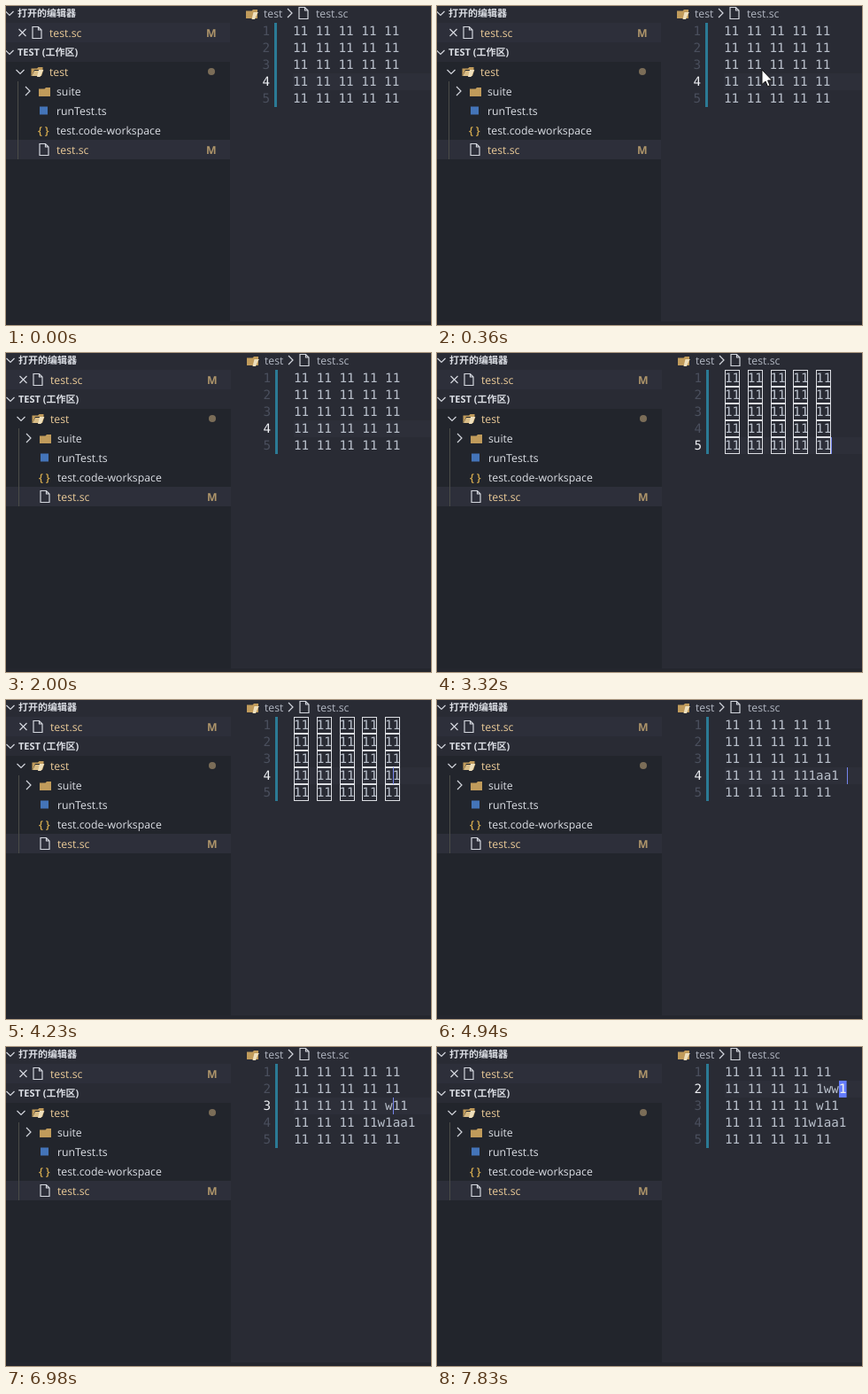
These frames come from a looping animation (480 px wide and 360 px high, 7.99 s). An HTML page:

```html
<!DOCTYPE html>
<html lang="zh">
<head>
<meta charset="utf-8">
<title>Editor</title>
<style>
  html, body { margin: 0; width: 100%; height: 100%; overflow: hidden; background: #292b34; }
  svg { display: block; width: 480px; height: 360px; }
  text { white-space: pre; text-rendering: geometricPrecision; }
  .ui { font: 12.3px "Open Sans", "Noto Sans", sans-serif; fill: #dcdfe5; }
  .head { font: bold 11px "Open Sans", "Noto Sans CJK SC", "Noto Sans CJK", sans-serif; fill: #dcdfe5; }
  .mod { fill: #ebcb98; }
  .mark { fill: #ad946a; font-weight: bold; }
  .brace { fill: #d9ae50; font-weight: 600; }
  .crumb { fill: #b2b7c2; }
  .code { font: 14.28px "DejaVu Sans Mono", monospace; fill: #b9c0cb; }
  .num { fill: #4a4f5d; }
  .num.on, #over { fill: #eceef2; }
  .line { fill: none; stroke: #d3d6dd; stroke-width: 1.2; }
  .box { fill: none; stroke: #dcdee3; }
</style>
</head>
<body>
<svg viewBox="0 0 480 360">
  <defs>
    <path id="down" class="line" d="M-4.5 -2 0 2.5 4.5 -2"/>
    <path id="right" class="line" d="M-3 -5 2 0 -3 5"/>
    <path id="file" class="line" d="M-5 -6.5H1.5L5 -3V6.5H-5ZM1.5 -6.5V-3H5"/>
    <path id="folder" fill="#c09b5b" d="M-6.5 -3.5H0L1.5 -5H6.5V5H-6.5Z"/>
    <path id="tube" fill="#efe0bd" d="M2 -2H7.5L6 0 3.5 6H0Z"/>
    <g id="open">
      <path fill="#c09b5b" d="M-6.5 5V-3.5H0L1.5 -5H6.5V-2H-3L-6 5Z"/>
      <path fill="#d9bd86" d="M-3 -1H7L5 5H-6Z"/>
    </g>
  </defs>
  <rect width="480" height="360" fill="#292b34"/>
  <g id="stage">
    <rect x="-2" width="255" height="360" fill="#22252c"/>
    <path fill="#292b34" d="M-2 0H253V19H-2ZM-2 41H253V63H-2Z"/>
    <path fill="#2d2f3a" d="M-2 19H253V41H-2ZM-2 151H253V173H-2Z"/>
    <path fill="#24262e" d="M-2 356H482V360H-2Z"/>

    <use href="#down" x="4" y="8"/>
    <text class="head" x="13" y="12">打开的编辑器</text>
    <path class="line" d="M14.5 26 22.5 34M22.5 26 14.5 34"/>
    <use href="#file" x="35" y="30"/>
    <text class="ui mod" x="49" y="35">test.sc</text>
    <text class="ui mark" x="226" y="35">M</text>
    <use href="#down" x="4" y="52"/>
    <text class="head" x="13" y="56">TEST (工作区)</text>

    <path d="M13.5 85V173" stroke="#4b4c48"/>
    <use href="#down" x="16" y="74"/>
    <use href="#open" x="35" y="74"/>
    <use href="#tube" x="35" y="74"/>
    <text class="ui mod" x="49" y="79">test</text>
    <circle cx="232" cy="74" r="4" fill="#7b6d58"/>
    <use href="#right" x="25" y="96"/>
    <use href="#folder" x="43.5" y="97"/>
    <text class="ui" x="57" y="101">suite</text>
    <rect x="38" y="113.5" width="9" height="9" fill="#4474b8"/>
    <text class="ui" x="57" y="123">runTest.ts</text>
    <text class="ui brace" x="36" y="144.5">{ }</text>
    <text class="ui" x="57" y="145">test.code-workspace</text>
    <use href="#file" x="43" y="162"/>
    <text class="ui mod" x="57" y="167">test.sc</text>
    <text class="ui mark" x="226" y="167">M</text>

    <use href="#folder" x="277.5" y="9"/>
    <use href="#tube" x="277.5" y="9"/>
    <text class="ui crumb" x="291" y="13">test</text>
    <use href="#right" x="321" y="8"/>
    <use href="#file" x="336" y="8"/>
    <text class="ui crumb" x="350" y="13">test.sc</text>

    <rect id="current" x="324" width="160" height="19" fill="#2d2f39"/>
    <rect x="303" y="19" width="3" height="95" fill="#2b7a95"/>
    <rect id="block" width="8.6" height="19" fill="#647cff"/>
    <g id="rows"></g>
    <text id="over" class="code"></text>
    <g id="words"></g>
    <g id="word"></g>
    <rect id="caret" width="1" height="19" fill="#7585ec"/>
  </g>
  <path id="mouse" d="M0 0V16.5L4 13 6.5 18.8 9 17.7 6.6 12H11.5Z" fill="#fff" stroke="#111"/>
</svg>
<script>
const LOOP = 7990, LEFT = 324, TOP = 19, CHAR = 8.6, ROW = 19;
const GAP = 30, GLIDE = 60;
const PLAIN = '11 11 11 11 11';
const ARROWS = { '←': [-1, 0], '→': [1, 0], '↑': [0, -1], '↓': [0, 1] };

// start time and the keys pressed from then on
const typing = [
  [3030, '↓'], [3700, '←'], [4150, '↑'], [4690, '←⌫→aa→ '],
  [5620, '←'], [5820, '←'], [5940, '←'], [6465, '←'], [6550, '←'],
  [6770, 'w'], [6840, '↑'], [6920, 'w'], [7230, '↑'], [7640, 'w'], [7750, 'w']
];
// start, end, from, to
const glides = [
  [60, 410, [447, 345], [363, 57]],
  [570, 850, [363, 57], [433, 138]],
  [980, 1180, [433, 138], [482, 141]]
];

const $ = id => document.getElementById(id);
const clamp = p => Math.max(0, Math.min(1, p));
const smooth = p => p * p * (3 - 2 * p);
const mix = (a, b, p) => a + (b - a) * p;
const within = (t, a, b) => t >= a && t < b;
const rowY = r => TOP + r * ROW;

function press({ col, row, lines }, key, at) {
  const [dx, dy] = ARROWS[key] || [key === '⌫' ? -1 : 1, 0];
  const next = [...lines], s = lines[row];
  if (key === '⌫') next[row] = s.slice(0, col - 1) + s.slice(col);
  else if (!ARROWS[key]) next[row] = s.slice(0, col) + key + s.slice(col);
  return { at, col: col + dx, row: row + dy, lines: next };
}

const states = [{ at: 0, col: 14, row: 3, lines: Array(5).fill(PLAIN) }];
for (const [at, keys] of typing)
  [...keys].forEach((key, i) => states.push(press(states[states.length - 1], key, at + i * GAP)));

function add(parent, tag, attrs, text = '') {
  const el = document.createElementNS('http://www.w3.org/2000/svg', tag);
  set(el, attrs);
  el.textContent = text;
  return parent.appendChild(el);
}

function set(el, attrs) {
  for (const k in attrs) el.setAttribute(k, attrs[k]);
}

function show(el, on) {
  el.style.display = on ? '' : 'none';
}

function addBox(parent, col, row, len) {
  add(parent, 'rect', {
    class: 'box', x: Math.round(LEFT + col * CHAR) + 0.5, y: rowY(row) + 0.5,
    width: Math.floor(len * CHAR) - 1, height: ROW - 1
  });
}

const rows = [], nums = [];
for (let r = 0; r < 5; r++) {
  const y = rowY(r) + 14;
  nums.push(add($('rows'), 'text', { class: 'code num', x: 289.4, y }, r + 1));
  rows.push(add($('rows'), 'text', { class: 'code', x: LEFT, y }));
  for (const m of PLAIN.matchAll(/\S+/g)) addBox($('words'), m.index, r, m[0].length);
}
addBox($('word'), 9, 3, 6);

function drawEditor(t) {
  const i = states.filter(s => s.at <= t).length - 1;
  const now = states[i], prev = states[i - 1] || now, next = states[i + 1];
  const time = next ? Math.min(GLIDE, next.at - now.at) : GLIDE;
  const p = clamp((t - now.at) / time);
  const x = LEFT + mix(prev.col, now.col, p) * CHAR;
  const y = rowY(mix(prev.row, now.row, p));

  rows.forEach((el, r) => {
    if (el.textContent !== now.lines[r]) el.textContent = now.lines[r];
    nums[r].classList.toggle('on', r === now.row);
  });
  set($('current'), { y: rowY(now.row) });
  show($('words'), within(t, 3320, 4690));
  show($('word'), within(t, 6200, 6770));

  const isBlock = t >= 7230;
  show($('caret'), within(t, 3030, 5460) || within(t, 5620, 7230));
  set($('caret'), { x: Math.round(x), y });
  show($('block'), isBlock);
  show($('over'), isBlock);
  set($('block'), { x, y });
  set($('over'), { x: LEFT + now.col * CHAR, y: rowY(now.row) + 14 });
  $('over').textContent = now.lines[now.row][now.col] || '';
}

function drawMouse(t) {
  const [a, b, from, to] = glides.filter(g => g[0] <= t).pop() || glides[0];
  const p = smooth(clamp((t - a) / (b - a)));
  const [x, y] = from.map((v, k) => Math.round(mix(v, to[k], p)));
  show($('mouse'), within(t, 60, 1180));
  set($('mouse'), { transform: `translate(${x} ${y})` });
}

function draw(t) {
  set($('stage'), { transform: `translate(${t < 2000 ? 0 : 1} 0)` });
  drawEditor(t);
  drawMouse(t);
}

const start = performance.now();
function tick() {
  draw((performance.now() - start) % LOOP);
  requestAnimationFrame(tick);
}
tick();
</script>
</body>
</html>
```
